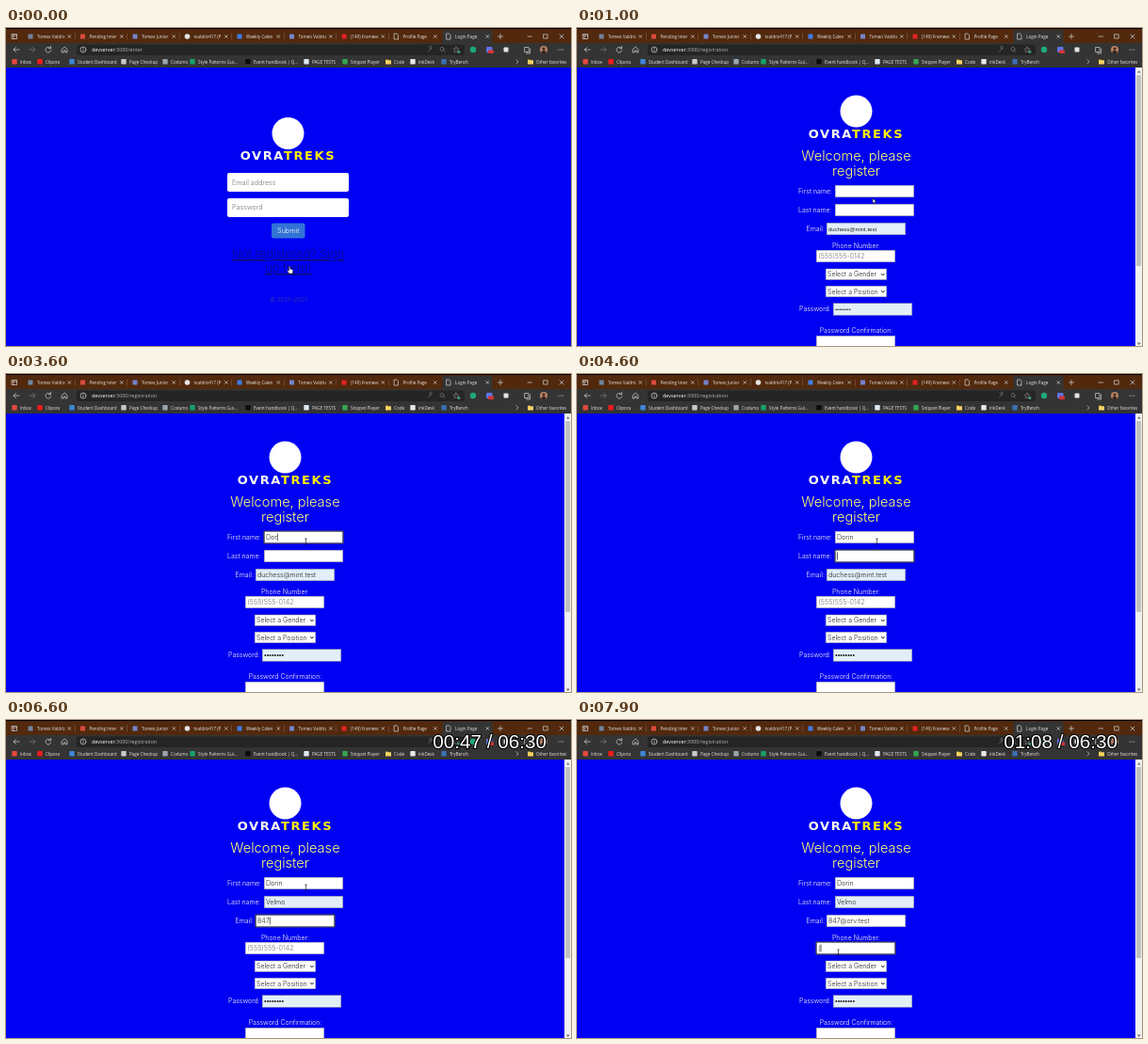
Recreate the animation shown at these times as an HTML page. Size 600x338 px, loop 8000 ms.

```html
<!DOCTYPE html>
<html lang="en">
<head>
<meta charset="utf-8">
<title>Registration</title>
<style>
  html, body { margin: 0; width: 100%; height: 100%; overflow: hidden; background: #0000f2; }
  svg { display: block; width: 600px; height: 338px; }
  text { white-space: pre; font-family: Inter, sans-serif; font-size: 7px; font-weight: 350; fill: #fffff0; }
  .ui { font-family: "Open Sans", "Noto Sans", sans-serif; font-size: 4.6px; font-weight: 400; fill: #e9e6e3; }
  .url { font-size: 5.4px; fill: #b5b5b5; }
  .host { fill: #fff; }
  .line { fill: none; stroke: #d6d6d6; stroke-width: .7; stroke-linecap: round; stroke-linejoin: round; }
  .dim { stroke: #7c7c7c; }
  .brand { font-family: "DejaVu Sans", sans-serif; font-size: 13px; font-weight: 700; letter-spacing: 1.6px; }
  .sun { fill: #fff200; }
  .title { font-size: 14.6px; fill: #ffff6a; }
  .mid { text-anchor: middle; }
  .hint { fill: #757575; font-size: 7.2px; font-weight: 300; }
  .submit { font-size: 7.2px; }
  .link { font-size: 12.9px; font-weight: 200; fill: #101058; text-decoration: underline; text-decoration-thickness: .7px; }
  .copy { font-size: 6.5px; fill: #40409a; }
  .value { fill: #222; }
  .preview { font-family: "Liberation Sans", Arial, sans-serif; font-size: 6px; font-weight: 400; }
  .dots { font-family: "Liberation Sans", Arial, sans-serif; font-size: 7.5px; }
  .timer { font-family: "Liberation Sans", Arial, sans-serif; font-size: 20.7px; font-weight: 400; fill: #fff;
           stroke: #000; stroke-width: 2.2px; stroke-linejoin: round; paint-order: stroke; }
</style>
</head>
<body>
<svg id="stage" viewBox="0 0 600 338"></svg>
<script>
const NS = "http://www.w3.org/2000/svg";
const stage = document.getElementById("stage");
let parent = stage;

function add(tag, attrs, content) {
  const el = document.createElementNS(NS, tag);
  for (const k in attrs) el.setAttribute(k, attrs[k]);
  if (content !== undefined) el.textContent = content;
  return parent.appendChild(el);
}
const rect = (x, y, width, height, fill, rx = 0) => add("rect", { x, y, width, height, fill, rx });
const disc = (cx, cy, r, fill) => add("circle", { cx, cy, r, fill });
const line = (d, cls = "") => add("path", { d, class: "line " + cls });
const text = (x, y, str, cls = "") => add("text", { x, y, class: cls }, str);
function group(build) {
  const outer = parent, g = add("g", {});
  parent = g;
  build();
  parent = outer;
  return g;
}
const show = (el, on) => { el.style.display = on ? "" : "none"; };
const cross = (x, y, r) => line(`M${x - r} ${y - r}l${2 * r} ${2 * r}m0 ${-2 * r}l${-2 * r} ${2 * r}`);

// ---- browser frame ----
const tabs = [
  ["Tomeo Valdriz", "#71849c"], ["Pending Inter", "#dc4a3c"], ["Tomeo Junior I", "#7584cc"],
  ["tvaldriz417 (P", "#e4e4e4"], ["Weekly Calen", "#3f7de8"], ["Tomeo Valdriz", "#7584cc"],
  ["(149) Framewo", "#e32222"], ["Profile Page"], ["Login Page"]
];
const marks = [
  [9, "Inbox", "#e04a3d"], [36, "Clipora", "#ee1c1c"], [70, "Student Dashboard", "#3f86d8"],
  [125, "Page Checkup", "#c9c9c9"], [169, "Codumo", "#9aa4ad"], [198, "Style Patterns Gui...", "#16a269"],
  [257, "Event handbook | Q...", "#0c0c0c"], [319, "PAGE TESTS", "#dfe8f2"], [360, "Snippet Player", "#35a455"],
  [406, "Code"], [432, "inkDesk", "#e8e8e8"], [465, "TryBench", "#3a6fb4"], [557, "Other favorites"]
];

function folder(x, y) {
  rect(x - 3, y - 2.6, 3, 2, "#e0a92c", .5);
  rect(x - 3, y - 1.8, 6, 4.4, "#f8d264", .5);
}

function drawBrowser() {
  rect(0, 0, 600, 17, "#52290d");
  rect(0, 0, 600, 1, "#000");
  rect(0, 16, 600, 27, "#343434");
  rect(463.5, 2, 53, 15, "#343434", 2);
  rect(75, 17.5, 412, 11.5, "#252525", 2);
  line("M6.5 6.5h5v5h-5zM6.5 8h5M8 8v3.5");

  tabs.forEach(([name, color], i) => {
    const x = 26 + i * 55.5;
    if (!color) line(`M${x - 2} 6h2.6l1.4 1.4v4.6h-4z`);
    else if (i === 3) disc(x, 9, 2.8, color);
    else rect(x - 2.5, 6.5, 5, 5, color, .6);
    const clip = add("clipPath", { id: "tab" + i });
    clip.appendChild(rect(x + 6, 2, 30.5, 14, "#000"));
    text(x + 7, 10.8, name, "ui").setAttribute("clip-path", `url(#tab${i})`);
    cross(x + 41.3, 9, 1.4);
    if (i < 7) rect(x + 47, 5.5, .5, 7, "#8b6a52");
  });
  line("M522.5 9h5M525 6.5v5");
  line("M554 9h4.5M571 6.8h4.2v4.2h-4.2z");
  cross(590, 9, 2);

  line("M14 23h-6m2.5-2.5l-2.5 2.5l2.5 2.5");
  line("M25 23h6m-2.5-2.5l2.5 2.5l-2.5 2.5", "dim");
  line("M47.4 21.6a2.9 2.9 0 1 0 .4 2.2m-.2-4.3v2.2h-2.2");
  line("M59.4 22.6l2.8-2.6l2.8 2.6v3.3h-1.9v-2h-1.8v2h-1.9z");
  line("M85 23a3 3 0 1 0-6 0a3 3 0 1 0 6 0M82 22.8v1.6M82 21.4v.1");
  line("M452 21.5a1.3 1.3 0 1 0-.1.1l-3.4 3.3", "dim");
  line("M465 22.4a2 2 0 1 0-4 0a2 2 0 1 0 4 0m-.6 1.4l1.8 1.8", "dim");
  line("M478 20l.9 2l2.2.2l-1.7 1.5l.6 2.2l-2-1.2l-2 1.2l.6-2.2l-1.7-1.5l2.2-.2z", "dim");
  disc(481, 25.5, 1.4, "#35a977");
  disc(496, 23, 3.2, "#20a879");
  rect(510, 20, 6.5, 6, "#5f74e6", 1);
  rect(512, 23.5, 6, 3.5, "#d83434", .8);
  rect(528.5, 20.5, 5, 5, "#e2e2e2", .8);
  line("M551 20.5h4v5h-4zM556.5 22v5h-4");
  disc(571, 23, 4, "#b98468");
  disc(571, 22, 1.5, "#3a241c");
  add("path", { d: "M568.3 25.9a2.8 2.8 0 0 1 5.4 0a4 4 0 0 1-5.4 0z", fill: "#3a241c" });
  for (const x of [587, 589.3, 591.6]) disc(x, 23, .6, "#d6d6d6");

  for (const [x, name, color] of marks) {
    if (color) rect(x - 2.7, 33, 5.4, 5.4, color, .7);
    else folder(x, 36);
    text(x + 6, 37.6, name, "ui");
  }
  line("M542 33.8l2 2l-2 2");
}

// ---- pages ----
function logo(cx, top) {
  disc(cx, top + 18, 17, "#fff");
  const word = text(cx - 50.8, top + 46.3, "OVRA", "brand");
  const span = document.createElementNS(NS, "tspan");
  span.setAttribute("class", "sun");
  span.textContent = "TREKS";
  word.appendChild(span);
}

function drawLogin() {
  logo(299.5, 94);
  rect(235, 154, 129, 20, "#fff", 2);
  text(240, 167, "Email address", "hint");
  rect(235, 181, 129, 20, "#fff", 2);
  text(240, 193, "Password", "hint");
  rect(282, 207.5, 35.5, 16, "#3273d8", 2);
  text(299.7, 218, "Submit", "submit mid");
  text(299.7, 245.2, "Not registered? Sign", "link mid");
  text(299.7, 260, "up here!", "link mid");
  text(300, 291, "© 2017–2021", "copy mid");
}

const TINT = "#e3eff8";
function outlined(x, y, width, height, fill) {
  const box = rect(x, y, width, height, fill);
  box.setAttribute("stroke", "#8c8c9c");
  box.setAttribute("stroke-width", .5);
  return box;
}
function input(x, y, fill = "#fff") {
  const box = outlined(x + .2, y + .2, 83.6, 12.6, fill);
  return { x, y, box, value: text(x + 2, y + 8.8, "", "value") };
}
function select(y, label) {
  outlined(264.2, y, 64.6, 11.6, "#fff");
  text(266, y + 8.4, label, "value");
  add("path", { d: `M323.2 ${y + 5}l1.7 1.8l1.7-1.8`, fill: "none", stroke: "#111", "stroke-width": 1 });
}

const fields = {};
let phoneHint, ring, caret;
function drawForm() {
  logo(296.5, 70.5);
  text(296.5, 140.7, "Welcome, please", "title mid");
  text(296.5, 157.2, "register", "title mid");
  text(235, 175.6, "First name:");
  fields.first = input(274, 167);
  text(235, 195.6, "Last name:");
  fields.last = input(274, 187);
  text(243.5, 215.6, "Email:");
  fields.email = input(265, 207, TINT);
  text(296.5, 233.6, "Phone Number:", "mid");
  fields.phone = input(254, 236);
  phoneHint = text(256.3, 245, "(555)555-0142", "hint");
  select(256, "Select a Gender");
  select(274.2, "Select a Position");
  text(236, 301.2, "Password:");
  fields.pass = input(272, 292.5, TINT);
  text(296.5, 324, "Password Confirmation:", "mid");
  input(254, 327);

  ring = add("rect", { width: 84, height: 13, rx: .8, fill: "none", stroke: "#48484c", "stroke-width": 1.2 });
  caret = rect(0, 0, .7, 8, "#111");

  rect(593, 42, 7, 296, "#f1f1f1");
  rect(594, 50, 5, 203, "#c1c1c1");
  add("path", { d: "M595 47.6l1.8-2.4l1.8 2.4zM595 334.5l1.8 2.4l1.8-2.4z", fill: "#666" });
}

// ---- timeline: each step changes only the listed keys ----
const LOOP = 8000;
const steps = [
  [0, { page: "login", first: "", last: "", email: "duchess@mint.test", phone: "", pass: "••••••••", focus: "", timer: "", real: false }],
  [400, { page: "form" }],
  [1800, { real: true }],
  [1900, { focus: "first" }],
  [3200, { first: "D" }],
  [3400, { first: "Do" }],
  [3600, { first: "Dor" }],
  [3800, { first: "Dori" }],
  [4000, { first: "Dorin" }],
  [4400, { focus: "last" }],
  [6300, { last: "Velmo", focus: "email", email: "", timer: "00:42" }],
  [6500, { email: "847", timer: "00:47" }],
  [6900, { email: "847@orv", timer: "00:52" }],
  [7200, { email: "847@orv.test", timer: "00:57" }],
  [7500, { focus: "phone", timer: "01:02" }],
  [7700, { phone: "(", timer: "01:07" }],
  [7900, { timer: "01:08" }]
];
const path = [
  [0, 301, 256], [500, 301, 256], [900, 314, 181], [1500, 314, 181],
  [1800, 318.5, 178], [7499, 318.5, 178], [7500, 277.5, 247], [LOOP, 277.5, 247]
];

function pointerAt(t) {
  const i = path.findIndex(p => p[0] > t);
  const [t0, x0, y0] = path[i - 1], [t1, x1, y1] = path[i];
  const k = (t - t0) / (t1 - t0), e = k * k * (3 - 2 * k);
  return [x0 + (x1 - x0) * e, y0 + (y1 - y0) * e];
}

drawBrowser();
const url = text(91, 25, "", "ui url");
parent = url;
const host = add("tspan", { class: "host" }, "devserver");
const rest = add("tspan", {});
parent = stage;
rect(0, 42, 600, 296, "#0000f2");
const login = group(drawLogin);
const form = group(drawForm);
const timer = text(453.2, 29.8, "", "timer");

const edge = { fill: "#fff", stroke: "#000", "stroke-width": .5, "stroke-linejoin": "round" };
let hand, arrow, beam;
const pointer = group(() => {
  hand = add("path", { ...edge, d: "M-.6-2.5q.7-.8 1.3 0v2.6l2.5.6q.7.3.6 1.2l-.5 3.2h-3.7l-2-3q.2-1 1.8.1z" });
  arrow = add("path", { ...edge, d: "M0 0v5.2l1.2-1.1l.9 2l.9-.4l-.9-1.9h1.6z" });
  beam = add("path", { fill: "none", stroke: "#111", "stroke-width": .6, d: "M-1.3-3h2.6M0-3v6M-1.3 3h2.6" });
});

function render(t) {
  const s = {};
  let blinkFrom = 0;
  for (const [at, change] of steps) {
    if (at > t) break;
    Object.assign(s, change);
    blinkFrom = at;
  }
  const onForm = s.page === "form";
  show(login, !onForm);
  show(form, onForm);
  rest.textContent = onForm ? ":3000/registration" : ":3000/enter";

  for (const key in fields) fields[key].value.textContent = s[key];
  const style = s.real ? "value" : "value preview";
  fields.email.value.setAttribute("class", style);
  fields.pass.value.setAttribute("class", s.real ? style + " dots" : style);
  fields.last.box.setAttribute("fill", s.last ? TINT : "#fff");
  fields.email.box.setAttribute("fill", s.last ? "#fff" : TINT);
  show(phoneHint, !s.phone);

  const f = fields[s.focus];
  show(ring, f);
  show(caret, f && (t - blinkFrom) % 1000 < 500);
  if (f) {
    ring.setAttribute("x", f.x);
    ring.setAttribute("y", f.y);
    const width = s[s.focus] ? f.value.getComputedTextLength() : 0;
    caret.setAttribute("x", f.x + 2.2 + width);
    caret.setAttribute("y", f.y + 2.4);
  }

  timer.textContent = s.timer && s.timer + " / 06:30";
  const [x, y] = pointerAt(t);
  pointer.setAttribute("transform", `translate(${x} ${y})`);
  show(hand, !onForm);
  show(arrow, onForm && t < 1800);
  show(beam, t >= 1800);
}

const start = performance.now();
function tick() {
  render((performance.now() - start) % LOOP);
  requestAnimationFrame(tick);
}
tick();
</script>
</body>
</html>
```
